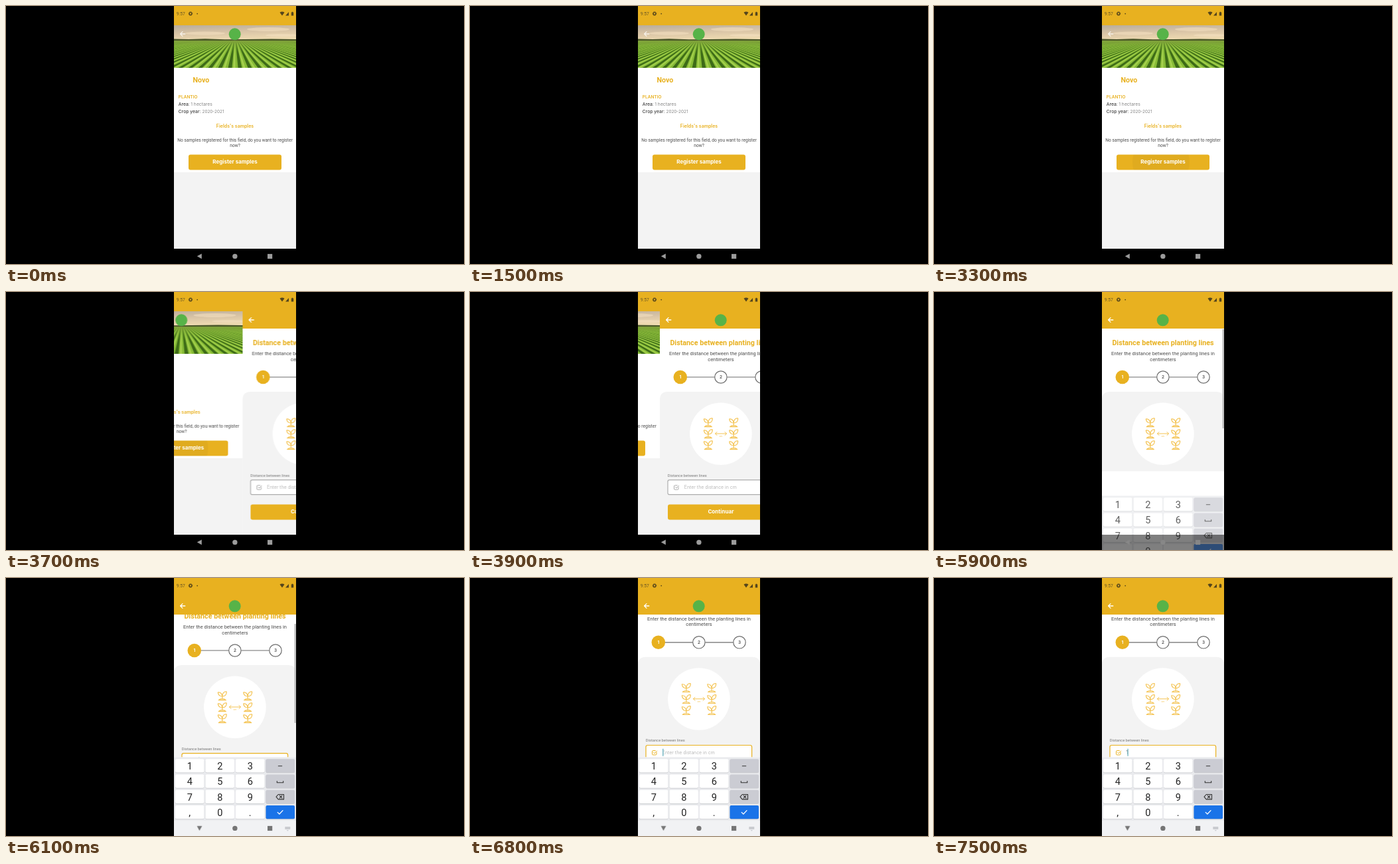
Animation of 690 by 388 pixels, one loop 8 s. Source, as an HTML page:

```html
<!DOCTYPE html>
<html lang="en">
<head>
<meta charset="utf-8">
<title>Field samples</title>
<style>
html, body { margin: 0; width: 100%; height: 100%; overflow: hidden; background: #000; }
svg { display: block; width: 690px; height: 388px; }
text { font-family: Roboto, "Noto Sans", sans-serif; fill: #4c4c4c; }
.geo { font-family: Inter, "Open Sans", sans-serif; }
.mid { text-anchor: middle; }
.b { font-weight: 700; }
.sb { font-weight: 600; }
.or { fill: #e8b120; }
.w { fill: #fff; }
.grey { fill: #868686; }
.line { fill: none; stroke-linecap: round; stroke-linejoin: round; }

/* every change is a hard cut on a 100 ms beat: 1.25% each */
.a { animation: 8s step-end -10ms infinite; }
.slide { animation-name: slide; }
.ripple { animation-name: ripple; }
.field { animation-name: focus; color: #adadad; }
.caret { animation-name: caret; }
.hint { animation-name: hint; }
.typed { animation-name: typed; }
.scroll { animation-name: scroll; }
.bar { animation-name: bar; }
.gap { animation-name: gap; }
.keys { animation-name: keys; }
.press { animation-name: press; }
.nav { animation-name: nav; }
.icons { animation-name: icons; }
.back { animation-name: back; transform-origin: 291.5px 376.3px; }
.hide { animation-name: hide; }

@keyframes slide {
  0% { transform: none; }
  42.5% { transform: translateX(-5px); }
  43.75% { transform: translateX(-20px); }
  45% { transform: translateX(-48px); }
  46.25% { transform: translateX(-80.5px); }
  47.5% { transform: translateX(-118px); }
  48.75% { transform: translateX(-151px); }
  50% { transform: translateX(-174px); }
  51.25%, 100% { transform: translateX(-184px); }
}
@keyframes ripple { 0% { opacity: 0; } 41.25%, 100% { opacity: .035; } }
@keyframes focus { 0% { color: #adadad; } 71.25%, 100% { color: #e8b120; } }
@keyframes caret {
  0% { opacity: 0; transform: none; }
  71.25% { opacity: 1; transform: none; }
  92.5%, 100% { opacity: 1; transform: translateX(1.3px); }
}
@keyframes hint { 0% { opacity: 1; } 92.5%, 100% { opacity: 0; } }
@keyframes typed { 0% { opacity: 0; } 92.5%, 100% { opacity: 1; } }
@keyframes scroll {
  0% { transform: none; }
  75% { transform: translateY(-6px); }
  76.25% { transform: translateY(-19px); }
  77.5% { transform: translateY(-28px); }
  78.75%, 100% { transform: translateY(-31.2px); }
}
@keyframes bar {
  0% { opacity: 0; transform: none; }
  72.5% { opacity: 1; transform: none; }
  75% { opacity: 1; transform: translateY(4px); }
  76.25% { opacity: 1; transform: translateY(13px); }
  77.5% { opacity: 1; transform: translateY(19px); }
  78.75% { opacity: 1; transform: translateY(21.5px); }
  82.5% { opacity: .6; transform: translateY(21.5px); }
  83.75% { opacity: .25; transform: translateY(21.5px); }
  85%, 100% { opacity: 0; transform: translateY(21.5px); }
}
@keyframes gap { 0% { opacity: 0; } 72.5%, 100% { opacity: 1; } }
@keyframes keys {
  0% { opacity: 0; transform: translateY(119px); }
  72.5% { opacity: .35; transform: translateY(85px); }
  73.75% { opacity: .72; transform: translateY(37px); }
  75% { opacity: .95; transform: translateY(9px); }
  76.25%, 100% { opacity: 1; transform: none; }
}
@keyframes press { 0% { opacity: 0; } 91.25% { opacity: .12; } 93.75%, 100% { opacity: 0; } }
@keyframes nav {
  0% { fill: #000; }
  72.5% { fill: rgba(0, 0, 0, .5); }
  75%, 100% { fill: #f1f2f4; }
}
@keyframes icons { 0% { fill: #9c9c9c; } 72.5% { fill: #878787; } 75%, 100% { fill: #757575; } }
@keyframes back { 0% { transform: none; } 75%, 100% { transform: rotate(-90deg); } }
@keyframes hide { 0% { opacity: 0; } 75%, 100% { opacity: 1; } }
</style>
</head>
<body>
<svg viewBox="0 0 690 388" xmlns="http://www.w3.org/2000/svg">
  <defs>
    <clipPath id="phone"><rect x="253" width="184" height="388"/></clipPath>
    <clipPath id="land"><rect x="253" y="51" width="184" height="42"/></clipPath>
    <clipPath id="page"><rect x="253" y="55" width="184" height="310"/></clipPath>
    <clipPath id="btn"><rect x="275" y="223.5" width="140" height="23" rx="3"/></clipPath>
    <linearGradient id="sky" x1="0" y1="0" x2=".25" y2="1">
      <stop offset="0" stop-color="#b9ad9c"/>
      <stop offset=".5" stop-color="#d9c4a6"/>
      <stop offset="1" stop-color="#f0dcb2"/>
    </linearGradient>
    <linearGradient id="haze" x1="0" y1="0" x2="0" y2="1">
      <stop offset="0" stop-color="#7f9c3c"/>
      <stop offset=".5" stop-color="#7fae35" stop-opacity=".4"/>
      <stop offset="1" stop-color="#7fae35" stop-opacity="0"/>
    </linearGradient>
    <path id="arrow" class="line" stroke="#fff" stroke-width="1.3" d="M269.8 42H262.6M266 38.6L262.6 42L266 45.4"/>
    <circle id="badge" cx="344.7" cy="42.3" r="9" fill="#57b348"/>
    <path id="plant" class="line" stroke="#f4c352" stroke-width="1.2"
      d="M0 1C-3.5 1-6-1-6.5-5C-3-5.3-.5-3 0 1C0-4 3-6.6 6.5-6C6.6-1 4 1 0 1V5M-5.5 6.7C-3 4 3 4 5.5 6.7Z"/>
  </defs>

  <rect width="690" height="388"/>
  <g clip-path="url(#phone)">
    <g class="a slide">
      <!-- field details -->
      <g>
        <rect x="253" y="93" width="184" height="272" fill="#f3f3f3"/>
        <rect x="253" y="93" width="184" height="157" fill="#fff"/>
        <rect x="253" y="29" width="184" height="24" fill="url(#sky)"/>
        <g fill="#f6e2c2" opacity=".55">
          <ellipse cx="300" cy="41" rx="30" ry="2.5"/>
          <ellipse cx="395" cy="35" rx="32" ry="3"/>
          <ellipse cx="415" cy="44" rx="24" ry="2"/>
        </g>
        <rect x="253" y="51" width="184" height="42" fill="#3d6b17"/>
        <g clip-path="url(#land)">
          <path id="rows" fill="#86bb36"/>
          <path id="shine" fill="#a6d14e"/>
        </g>
        <rect x="253" y="51" width="184" height="20" fill="url(#haze)"/>
        <path fill="#4a5729" d="M253 49.5L275 50L300 49.3L330 50.3L360 50L400 49.4L437 50V52H253Z"/>
        <use href="#badge"/>
        <use href="#arrow" opacity=".75"/>
        <text class="b or" x="281.5" y="114.6" font-size="10.7">Novo</text>
        <g class="geo">
          <text class="geo sb or" x="259.8" y="138.8" font-size="6.5">PLANTIO</text>
          <text class="geo" x="259.8" y="150" font-size="6.8" style="fill:#222">Area:</text>
          <text class="geo grey" x="278.2" y="150" font-size="6.8">1 hectares</text>
          <text class="geo" x="259.8" y="161" font-size="6.8" style="fill:#222">Crop year:</text>
          <text class="geo grey" x="295.5" y="161" font-size="6.4">2020-2021</text>
          <text class="geo sb or mid" x="345" y="183" font-size="7">Fields's samples</text>
        </g>
        <text class="mid" x="345" y="204" font-size="6.64">No samples registered for this field, do you want to register</text>
        <text class="mid" x="345" y="212.2" font-size="6.64">now?</text>
        <rect class="or" x="275" y="223.5" width="140" height="23" rx="3"/>
        <g clip-path="url(#btn)"><circle class="a ripple" cx="342" cy="235" r="43"/></g>
        <text class="geo b w mid" x="345" y="237.3" font-size="8">Register samples</text>
      </g>

      <!-- distance form -->
      <g transform="translate(184)">
        <rect x="253" y="29" width="184" height="336" fill="#fff"/>
        <g clip-path="url(#page)">
          <g class="a scroll">
            <text class="b or mid" x="345" y="80.2" font-size="10.72">Distance between planting lines</text>
            <text class="mid" x="345" y="95.2" font-size="7.46">Enter the distance between the planting lines in</text>
            <text class="mid" x="345" y="103.7" font-size="7.46">centimeters</text>
            <path stroke="#6d6d6d" stroke-width="1.2" d="M294 128H335.5M354.5 128H396.5"/>
            <circle class="or" cx="283.8" cy="128" r="10.3"/>
            <g fill="#fff" stroke="#6d6d6d" stroke-width="1.2">
              <circle cx="344.9" cy="128" r="9.2"/>
              <circle cx="406" cy="128" r="9.2"/>
            </g>
            <g font-size="6.4">
              <text class="geo b w mid" x="283.8" y="130.4">1</text>
              <text class="geo sb mid" x="344.9" y="130.4">2</text>
              <text class="geo sb mid" x="406" y="130.4">3</text>
            </g>
            <path fill="#f3f3f3" d="M253 420V162Q253 150 265 150H425Q437 150 437 162V420Z"/>
            <circle cx="344.9" cy="213.2" r="46.8" fill="#fff"/>
            <g id="plants"></g>
            <path class="line" stroke="#f4c352" stroke-width="1" d="M336.5 213H353.5M339 210.5L336.5 213L339 215.5M351 210.5L353.5 213L351 215.5"/>
            <text class="mid" x="345" y="218.3" font-size="3.6" style="fill:#f4c352">cm</text>
            <text x="264.8" y="277.6" font-size="5.75" style="fill:#777">Distance between lines</text>
            <g class="a field" stroke="currentColor" stroke-width="1.2">
              <rect x="265" y="282.7" width="159.6" height="22" rx="2.5" fill="#fff"/>
              <path class="line" stroke-width="1" d="M281 293.6V296Q281 297.2 279.8 297.2H275.7Q274.5 297.2 274.5 296V292Q274.5 290.8 275.7 290.8H279.3M276.6 293.6L278 295L281.6 291.3"/>
            </g>
            <text class="geo a hint" x="289.8" y="296.2" font-size="6.95" style="fill:#b9b9b9">Enter the distance in cm</text>
            <text class="geo a typed" x="289.4" y="296.2" font-size="6.95">1</text>
            <rect class="a caret" x="290" y="288" width="1.5" height="11" fill="#79b9c6"/>
            <rect class="or" x="265" y="319.5" width="160" height="23" rx="3"/>
            <text class="geo b w mid" x="345" y="333" font-size="8.1">Continuar</text>
          </g>
          <rect class="a bar" x="434.6" y="56" width="2" height="149" fill="#b4b4b4"/>
        </g>
        <rect class="or" x="253" y="29" width="184" height="26"/>
        <use href="#badge"/>
        <use href="#arrow"/>
      </g>
    </g>

    <!-- status bar -->
    <rect class="or" x="253" width="184" height="29"/>
    <g fill="#54451c">
      <text x="256.8" y="14" font-size="6.7" style="fill:#6b5824">9:57</text>
      <circle cx="278" cy="11.5" r="1.9" fill="none" stroke="#54451c" stroke-width="1.3"/>
      <circle cx="278" cy="11.5" r="2.8" fill="none" stroke="#54451c" stroke-width=".9" stroke-dasharray="1.2 1"/>
      <circle cx="288.2" cy="11.6" r=".9"/>
      <path d="M412.5 9.8Q416 7.2 419.5 9.8L416 14.5ZM421 14.5H426V9ZM429.8 9.4H430.7V8.7H432.2V9.4H433.2V14.5H429.8Z"/>
    </g>

    <!-- keyboard -->
    <rect class="a gap" x="253" y="269.5" width="184" height="119" fill="#fff"/>
    <g class="a keys">
      <rect x="253" y="269.5" width="184" height="119" fill="#e9eaed"/>
      <g id="pad"></g>
      <rect class="a press" x="255" y="272.3" width="43.5" height="20.2" rx="2"/>
      <g class="line" stroke="#333" stroke-width="1.1">
        <path d="M410.3 282.8H415.7"/>
        <path d="M408.3 305.5V307.8H417.7V305.5"/>
        <path d="M407 329.2L410.2 325.5H418.5V332.9H410.2ZM412.2 327.2L416 331.2M416 327.2L412.2 331.2"/>
        <path stroke="#fff" stroke-width="1.3" d="M409.2 352.4L411.9 355L417 349.6"/>
      </g>
    </g>

    <!-- navigation bar -->
    <rect class="a nav" x="253" y="365" width="184" height="23"/>
    <g class="a icons">
      <path class="a back" d="M287.8 376.3L294.8 372.4V380.2Z"/>
      <circle cx="344.9" cy="376.4" r="3.7"/>
      <rect x="394" y="372.9" width="7.2" height="7.2"/>
    </g>
    <g class="a hide" fill="#c9cbcf">
      <path d="M420.3 374H428.3V378H420.3ZM422.6 379H426L424.3 380.8Z"/>
    </g>
  </g>
</svg>
<script>
const NS = "http://www.w3.org/2000/svg";
const $ = id => document.getElementById(id);
function add(parent, tag, attrs, label) {
  const el = document.createElementNS(NS, tag);
  for (const k in attrs) el.setAttribute(k, attrs[k]);
  if (label) el.textContent = label;
  parent.append(el);
}

// crop rows fan out from a vanishing point
function fan(width, shift) {
  let d = "";
  for (let i = -45; i <= 45; i++) {
    const x = 345 + i * 15 + shift;
    d += `M345 45L${x - width} 93H${x + width}Z`;
  }
  return d;
}
$("rows").setAttribute("d", fan(4.6, 0));
$("shine").setAttribute("d", fan(1.6, -1));

for (const x of [325.8, 364.2])
  for (const y of [196, 213, 230])
    add($("plants"), "use", { href: "#plant", x, y });

["123 ", "456 ", "789 ", ",0. "].forEach((row, r) => {
  [...row].forEach((key, c) => {
    const x = 255 + c * 45.5, y = 272.3 + r * 23.25;
    const box = { x, y, width: 43.5, height: 20.2, rx: 2 };
    const fill = c < 3 ? "#fff" : r < 3 ? "#cbccd3" : "#1a73e8";
    add($("pad"), "rect", { ...box, y: y + .8, fill: "#c6c7cc" });
    add($("pad"), "rect", { ...box, fill });
    if (c < 3) add($("pad"), "text", { class: "mid", x: x + 21.8, y: y + 15.8, "font-size": 14.6, style: "fill:#222" }, key);
  });
});
</script>
</body>
</html>
```
